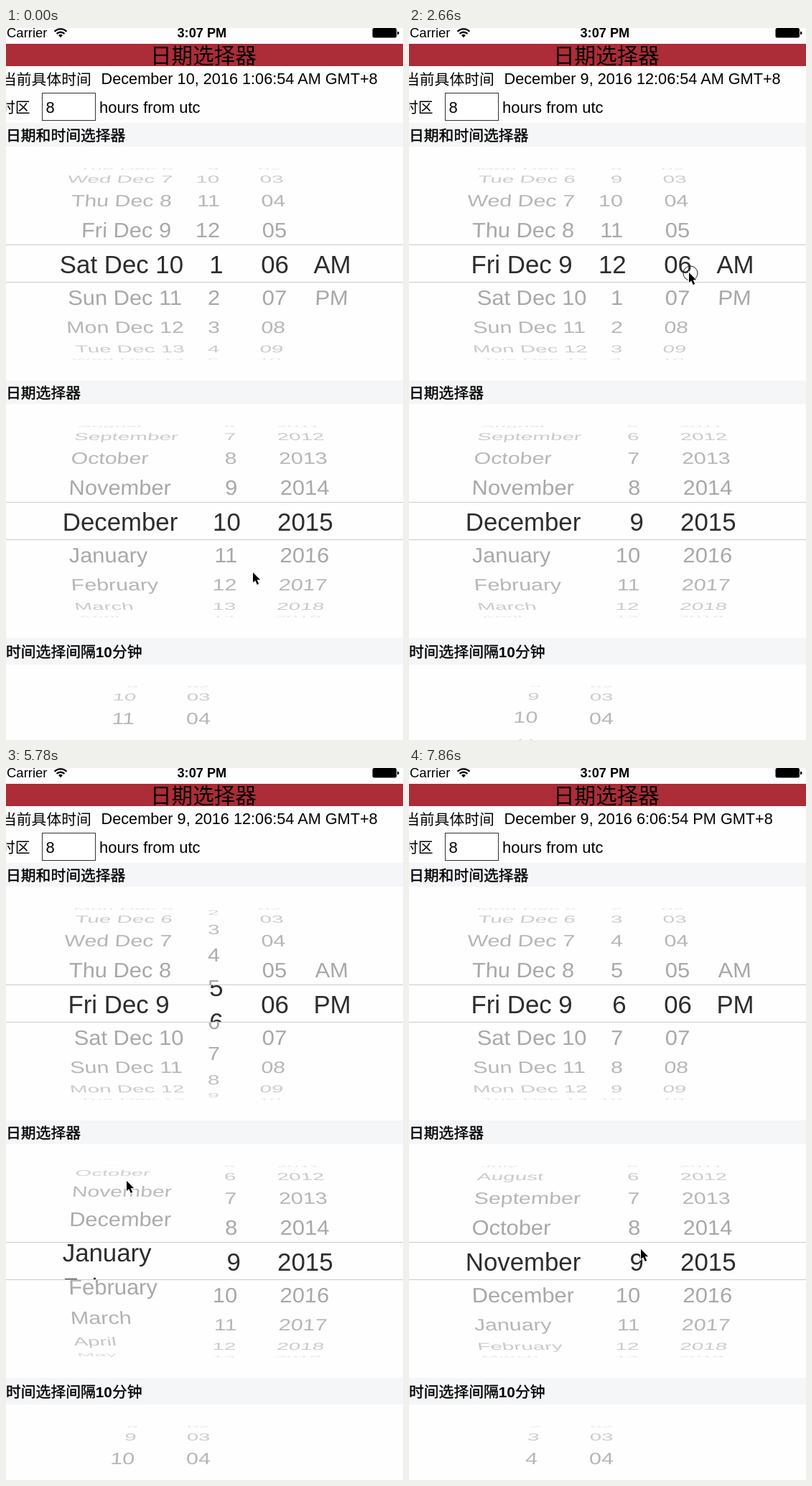
Recreate the animation shown at these times as an HTML page with a canvas. Size 553 px wide and 990 px high, loop 8 s.

```html
<!DOCTYPE html>
<html lang="zh">
<head>
<meta charset="utf-8">
<title>日期选择器</title>
<style>
  html, body { margin: 0; width: 100%; height: 100%; overflow: hidden; background: #fefefe; }
  svg, canvas { position: absolute; left: 0; top: 0; width: 553px; height: 990px; }
  text { font-family: "Liberation Sans", Arial, sans-serif; font-size: 21.7px; }
  .cjk { font-family: "Noto Sans CJK SC", "Noto Sans CJK", sans-serif; font-size: 20.8px; }
  .title { font-size: 29.6px; font-weight: 300; }
  .head { font-weight: 500; stroke: #000; stroke-width: .4px; }
  .head tspan { font-family: "Liberation Sans", Arial, sans-serif; font-weight: 700; stroke: none; }
</style>
</head>
<body>
<svg viewBox="0 0 553 990">
  <rect width="553" height="990" fill="#fefefe"/>
  <text x="1" y="13.2" style="font-size:18.5px">Carrier</text>
  <g fill="none" stroke="#000" stroke-width="2.4">
    <path d="M67.6 4.9a11.8 11.8 0 0 1 16.8 0M70.6 8a7.6 7.6 0 0 1 10.8 0"/>
    <path d="M76 13.2l-2.9-3a4.2 4.2 0 0 1 5.8 0z" fill="#000" stroke="none"/>
  </g>
  <text x="238.5" y="13.2" style="font-size:18.2px;font-weight:700">3:07 PM</text>
  <rect x="510.5" width="33.5" height="13.5" rx="2.5"/>
  <path d="M545 4.5q2.6 .6 2.6 2.5t-2.6 2.5z"/>

  <rect y="22" width="553" height="31" fill="#ac2c37"/>
  <text class="cjk title" x="201" y="49.2">日期选择器</text>
  <text class="cjk" x="-6" y="78.8">当前具体时间</text>
  <text id="stamp" x="132.5" y="78.2"></text>
  <text class="cjk" x="-8" y="117.8">时区</text>
  <rect x="50.5" y="90.5" width="74" height="38" fill="#fff" stroke="#333"/>
  <text x="55.5" y="117.5" style="font-size:22px">8</text>
  <text x="130" y="117.5" style="font-size:22px">hours from utc</text>

  <g fill="#f5f6f8">
    <rect y="132" width="553" height="33"/>
    <rect y="490" width="553" height="33"/>
    <rect y="848" width="553" height="37"/>
  </g>
  <text class="cjk head" x="0" y="156.8">日期和时间选择器</text>
  <text class="cjk head" x="0" y="514.8">日期选择器</text>
  <text class="cjk head" x="0" y="874.8">时间选择间隔<tspan>10</tspan>分钟</text>
  <path d="M0 301.5H553M0 353.5H553M0 659.5H553M0 711.5H553" stroke="#cbcbcb"/>
</svg>
<canvas id="stage" width="553" height="990"></canvas>

<script>
const ctx = document.getElementById('stage').getContext('2d');
const stamp = document.getElementById('stamp');
const LOOP = 8000, START = 588, STEP = 148;

// Wheel geometry: a cylinder seen in slight perspective
const RADIUS = 133.6, PITCH = 20.6 * Math.PI / 180, DEPTH = 1480, EYE_X = 276;
const SMALL = 31, LARGE = 34.8, BAND = 26;

const MONTHS = ['January', 'February', 'March', 'April', 'May', 'June', 'July',
  'August', 'September', 'October', 'November', 'December'];
const DAYS = ['Sun', 'Mon', 'Tue', 'Wed', 'Thu', 'Fri', 'Sat'];
const wrap = (i, n) => ((i % n) + n) % n;
const smooth = u => u * u * (3 - 2 * u);
const width = s => ctx.measureText(s).width;

const labels = {
  date: i => `${DAYS[wrap(i + 3, 7)]} Dec ${i}`,
  hour: i => `${wrap(i - 1, 12) + 1}`,
  minute: i => `${wrap(i, 60)}`.padStart(2, '0'),
  half: i => ['AM', 'PM'][i],
  month: i => MONTHS[wrap(i - 1, 12)],
  number: i => `${i}`
};

// lead: how much of a label lies left of its anchor; shift: anchor offset of the large text
const anchors = {
  start: { lead: () => 0, shift: -7.8 },
  mid: { lead: s => width(s) / 2, shift: 0 },
  end: { lead: width, shift: 4.3 },
  day: { lead: s => width(s.slice(0, s.lastIndexOf(' ') + 1)), shift: -4.3 }
};

// A move turns the wheel from where it rests to a new value
const move = (start, end, to) => ({ start, end, to });
const column = (y, x, kind, anchor, from, ...moves) =>
  ({ y, x, label: labels[kind], ...anchors[anchor], from, moves });

const dateTime = [
  column(328, 212.6, 'date', 'day', 10, move(2.5, 7, 9)),
  column(328, 298.3, 'hour', 'end', 13, move(9, 13, 12), move(26.4, 38.1, 18)),
  column(328, 374.5, 'minute', 'mid', 6, move(16, 20, 11), move(20, 24, 6)),
  column(328, 454.5, 'half', 'mid', 0, move(26, 29, 1))
];
const columns = [
  ...dateTime,
  column(686, 86.6, 'month', 'start', 12, move(33, 37, 13.5), move(37, 43.1, 9), move(43.1, 46, 11)),
  column(686, 322.5, 'number', 'end', 10, move(6, 9, 9)),
  column(686, 416.8, 'number', 'mid', 2015),
  column(1048, 177.1, 'hour', 'end', 13, move(11, 15.7, 12), move(40.5, 46.1, 18)),
  column(1048, 267.8, 'minute', 'mid', 6),
  column(1048, 364, 'half', 'mid', 0, move(41, 46, 1))
];

// Stops of the pointer: step, x, y
const stops = [[0, 344, 757], [3, 176, 337], [7, 190, 397], [9, 282, 312], [13, 300, 362],
  [15, 390, 340], [20, 393, 76], [25, 448, 345], [29, 301, 260], [31, 240, 586],
  [33, 168, 634], [36, 168, 574], [42, 196, 661], [46, 302, 672], [48, 302, 672], [50, 323, 669]];

function position(col, n) {
  return col.moves.reduce((pos, { start, end, to }) => {
    const u = Math.min(1, Math.max(0, (n - start) / (end - start)));
    return pos + (to - pos) * smooth(u);
  }, col.from);
}

function pointerAt(n) {
  const next = stops.findIndex(s => s[0] > n);
  if (next < 0) return stops[stops.length - 1].slice(1);
  const [a, ...from] = stops[next - 1], [b, ...to] = stops[next];
  return from.map((v, i) => v + (to[i] - v) * smooth((n - a) / (b - a)));
}

// The time line takes over the wheels one step after all of them rest
function stampAt(n) {
  const turning = step => dateTime.some(c => c.moves.some(m => m.start <= step && step < m.end));
  let step = n - 1;
  while (turning(step)) step--;
  const [date, hour, minute, half] = dateTime.map(c => c.label(Math.round(position(c, step))));
  return `December ${date.split(' ')[2]}, 2016 ${hour}:${minute}:54 ${half} GMT+8`;
}

function drawRow(col, text, angle, size, x) {
  const sin = Math.sin(angle), cos = Math.cos(angle);
  const scale = DEPTH / (DEPTH + RADIUS * (1 - cos));
  const middle = x - col.lead(text) + width(text) / 2 - EYE_X;
  ctx.setTransform(scale, 0, -middle * sin / DEPTH, scale * cos,
    EYE_X + middle * scale, col.y + RADIUS * sin);
  ctx.fillText(text, 0, size * .36);
  ctx.resetTransform();
}

function drawRows(col, pos, large) {
  const size = large ? LARGE : SMALL;
  const x = large ? col.x + col.shift : col.x;
  const reach = large ? 1.5 : 4.3;
  ctx.save();
  ctx.beginPath();
  if (large) {
    ctx.rect(0, col.y - BAND, 553, 2 * BAND - 1);
  } else {
    ctx.rect(0, col.y - RADIUS, 553, RADIUS - BAND);
    ctx.rect(0, col.y + BAND, 553, RADIUS - BAND);
  }
  ctx.clip();
  ctx.font = `${size}px "Liberation Sans", Arial, sans-serif`;
  ctx.fillStyle = large ? '#2d2d2d' : '#a8a8a8';
  for (let i = Math.ceil(pos - reach); i <= pos + reach; i++) {
    const text = col.label(i), angle = (i - pos) * PITCH;
    if (!text) continue;
    ctx.globalAlpha = large ? 1 : Math.min(1, .2 + .85 * Math.cos(angle));
    drawRow(col, text, angle, size, x);
  }
  ctx.restore();
}

function drawPointer([x, y], pressed) {
  ctx.save();
  ctx.translate(x, y);
  if (pressed) {
    ctx.beginPath();
    ctx.arc(2, 1, 10, 0, 7);
    ctx.strokeStyle = '#222';
    ctx.stroke();
  }
  const arrow = new Path2D('M0 0V14L3.2 11.2 5.8 17 8.2 16 5.7 10.3H10.2Z');
  ctx.strokeStyle = '#fff';
  ctx.lineWidth = 2;
  ctx.stroke(arrow);
  ctx.fill(arrow);
  ctx.restore();
}

function draw(now) {
  const time = now % LOOP;
  const n = Math.max(0, Math.floor((time - START) / STEP) + 1);
  ctx.clearRect(0, 0, 553, 990);
  ctx.textAlign = 'center';
  for (const col of columns) {
    const pos = position(col, n);
    drawRows(col, pos, false);
    drawRows(col, pos, true);
  }
  drawPointer(pointerAt(n), n === 15);
  const text = stampAt(n);
  if (stamp.textContent !== text) stamp.textContent = text;
}

const begin = performance.now();
function tick() {
  draw(performance.now() - begin);
  requestAnimationFrame(tick);
}
tick();
</script>
</body>
</html>
```
